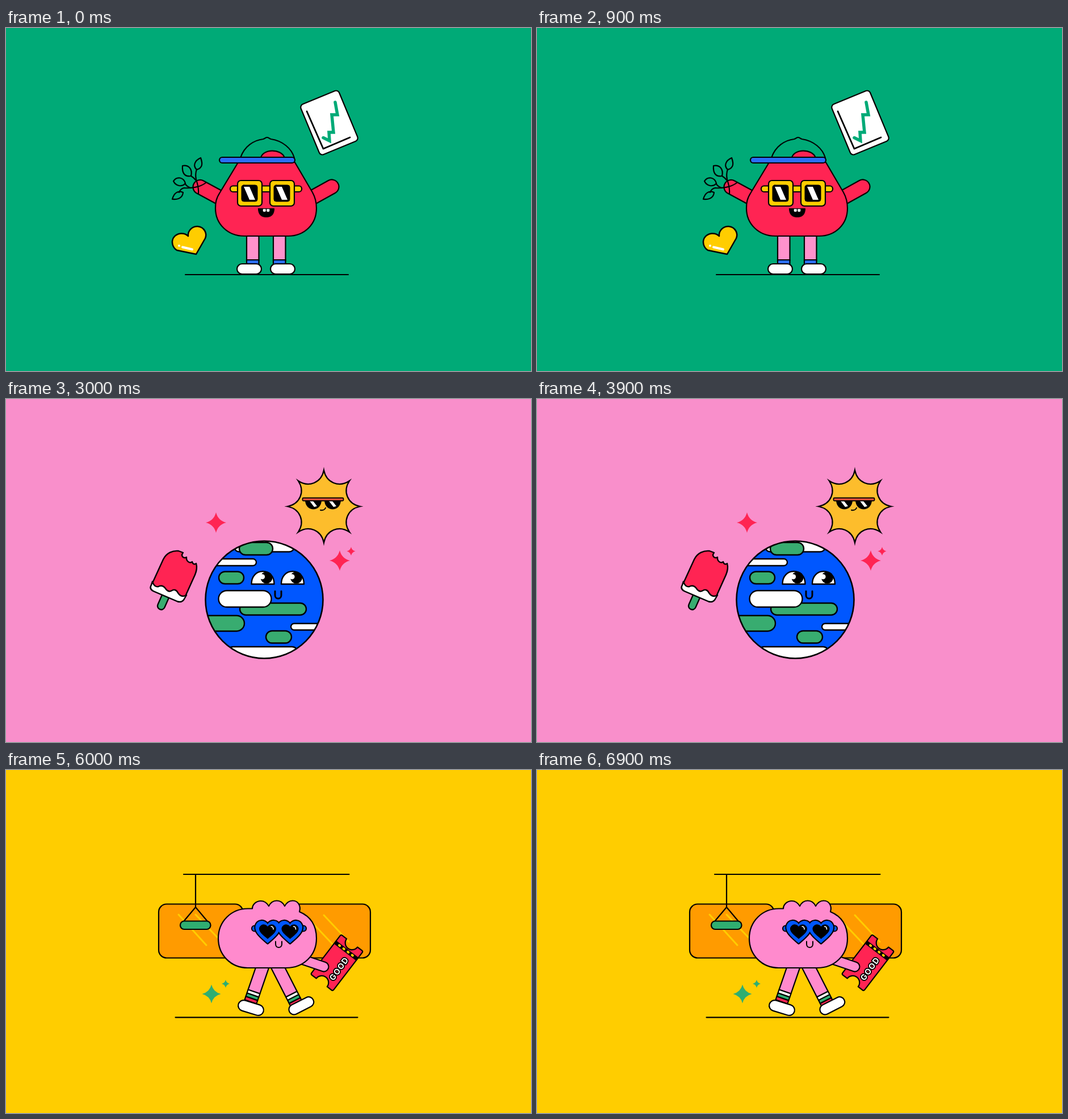
These frames come from a looping animation (925 px wide and 605 px high, 7.5 s). An HTML page with a canvas:

```html
<!DOCTYPE html>
<html lang="en">
<head>
<meta charset="utf-8">
<title>Five friends</title>
<style>
html, body { margin: 0; width: 100%; height: 100%; overflow: hidden; }
canvas { display: block; width: 925px; height: 605px; }
</style>
</head>
<body>
<canvas id="stage"></canvas>
<script>
const W = 925, H = 605, HOLD = 1500;
const cv = document.getElementById('stage');
const c = cv.getContext('2d');
const dpr = window.devicePixelRatio || 1;
cv.width = W * dpr;
cv.height = H * dpr;

const K = '#000', WHITE = '#fff', RED = '#ff2453', GREEN = '#00aa77', LEAF = '#38ac70',
  BLUE = '#2a6ef8', ROYAL = '#0057ff', YELLOW = '#ffcd00', PINK = '#ff8acd', BROWN = '#a5432f';
let lw = 2.2;

// Fill a path and outline it; pass 0 as width for no outline.
function shape(d, fill, w = lw, ink = K) {
  const p = new Path2D(d);
  if (fill) { c.fillStyle = fill; c.fill(p); }
  if (w) { c.lineWidth = w; c.strokeStyle = ink; c.stroke(p); }
}
const stroke = (d, w = lw, ink = K) => shape(d, null, w, ink);

function box(x, y, w, h, r, fill, line = lw) {
  c.beginPath();
  c.roundRect(x, y, w, h, r);
  c.fillStyle = fill;
  c.fill();
  if (line) { c.lineWidth = line; c.strokeStyle = K; c.stroke(); }
}
const pill = (x, y, w, h, fill) => box(x, y, w, h, Math.min(w, h) / 2, fill);

function disc(x, y, r, fill, line = 0) {
  c.beginPath();
  c.arc(x, y, r, 0, 7);
  if (fill) { c.fillStyle = fill; c.fill(); }
  if (line) { c.lineWidth = line; c.strokeStyle = K; c.stroke(); }
}

// Round-ended bar with an outline; w is the width between outline centres.
function limb(d, w, fill) {
  stroke(d, w + lw);
  stroke(d, w - lw, fill);
}

function at(x, y, deg, draw) {
  c.save();
  c.translate(x, y);
  c.rotate(deg * Math.PI / 180);
  draw();
  c.restore();
}

// Sock stripes hanging down from the origin.
const socks = (w, h, colors) =>
  colors.forEach((k, i) => box(-w / 2, i * h, w, h, 0, k));

function mouth(x, y, w, h, tooth, gap) {
  shape(`M${x} ${y}h${w}c0 ${h * .7} ${-w * .18} ${h} ${-w / 2} ${h}s${-w / 2} ${-h * .3} ${-w / 2} ${-h}z`, K, 1);
  for (const s of [-1, 1])
    box(x + w / 2 + s * (tooth + gap) / 2 - tooth / 2, y + .8, tooth, 5, [0, 0, 2, 2], WHITE, 0);
}

function sparkle(x, y, r, fill) {
  const k = r * .2;
  shape(`M${x} ${y - r}Q${x + k} ${y - k} ${x + r} ${y}Q${x + k} ${y + k} ${x} ${y + r}` +
    `Q${x - k} ${y + k} ${x - r} ${y}Q${x - k} ${y - k} ${x} ${y - r}z`, fill, 0);
}

function drop(x, top, bottom, r, fill) {
  const y = bottom - r, h = y - top;
  shape(`M${x} ${top}C${x + r * .25} ${top + h * .4} ${x + r} ${y - h * .4} ${x + r} ${y}` +
    `A${r} ${r} 0 0 1 ${x - r} ${y}C${x - r} ${y - h * .4} ${x - r * .25} ${top + h * .4} ${x} ${top}z`, fill);
  stroke(`M${x - r * .5} ${y + r * .05}q${r * .05} ${r * .5} ${r * .5} ${r * .6}`, r * .2, WHITE);
}

function heart(x, top, w, h) {
  const a = w / 2, y = top + h * .17;
  return `M${x} ${y}C${x - a * .2} ${top - h * .04} ${x - a * .85} ${top - h * .06} ${x - a} ${top + h * .25}` +
    `C${x - a * 1.08} ${top + h * .55} ${x - a * .4} ${top + h * .8} ${x} ${top + h}` +
    `C${x + a * .4} ${top + h * .8} ${x + a * 1.08} ${top + h * .55} ${x + a} ${top + h * .25}` +
    `C${x + a * .85} ${top - h * .06} ${x + a * .2} ${top - h * .04} ${x} ${y}z`;
}

function word(s, x, y, deg, font, fill, line, gap = 0) {
  at(x, y, deg, () => {
    c.font = font;
    c.letterSpacing = gap + 'px';
    c.textAlign = 'center';
    c.textBaseline = 'middle';
    if (line) { c.lineWidth = line; c.strokeStyle = K; c.strokeText(s, 0, 0); }
    c.fillStyle = fill;
    c.fillText(s, 0, 0);
  });
}

function cool() {
  lw = 2.2;
  stroke('M316 435H603');
  for (const x of [424, 471]) {
    box(x, 360, 21.5, 50, 0, '#ff92cc');
    box(x, 409, 21.5, 10, 0, BLUE);
  }
  pill(407, 416, 43, 18, WHITE);
  pill(466, 416, 43, 18, WHITE);
  limb('M342 280.5L378 300', 25, RED);
  limb('M574 280L538 300', 25, RED);
  shape('M409 237L377 290C370 301 369 308 369 318C369 346 391 367 420 367H497C526 367 547 346 547 318C547 306 545 299 540 290L509 237Z', RED);

  shape('M413 229C420 208 437 198 453 196C457 195 457 193 460 193S463 195 467 196C487 199 503 212 508 229Z', GREEN);
  shape('M449 229C452 213 485 212 491 229Z', RED);
  pill(376, 228, 133, 10, BLUE);

  box(395, 278.5, 126, 10.5, 5, YELLOW);
  for (const x of [408, 465]) box(x, 269, 43, 45, 6, YELLOW);
  for (const x of [415, 472]) {
    box(x, 277, 28, 29, 4, K, 1);
    shape(`M${x + 4} 280h10l10 23h-10z`, WHITE, 0);
  }
  mouth(444.5, 318.5, 28, 15, 5, 1.5);

  stroke('M352 273C342 281 325 283 314 282C309 283 306 287 305 290M316 275Q318 279 324 281.5M339 293C340 281 337 274 335 267Q333 258 336 249M326 261Q331 264 334 268');
  stroke('M293 302C296 291 303 286 312 290C311 299 305 303 293 302ZM295 270C301 261 313 263 316 274C310 281 299 279 295 270ZM311 243C322 241 329 249 326 261C314 263 310 255 311 243ZM343 229C347 240 346 247 336 250C329 243 332 234 343 229Z');

  shape('M335 399L301 392C293 387 291 377 295 370C301 361 314 360 321 367C320 357 329 349 338 350C349 351 355 362 351 371Z', YELLOW, 2.5);
  disc(305, 384, 2, WHITE);
  stroke('M311 386.5L328 390.5', 4, WHITE);

  at(569.5, 167, -22.5, () => box(-36.5, -48, 73, 96, 6, WHITE));
  stroke('M530 147L559 213L606 193', 2.8);
  c.lineJoin = 'miter';
  stroke('M580 131L584 153H574L577 184H569L570 199L559 193.5', 5.5, GREEN);
  c.lineJoin = 'round';
}

function surfer() {
  lw = 2;
  for (const y of [351, 391.5, 434.5]) {
    let d = '';
    for (let x = 288; x <= 635; x += 2)
      d += (d ? 'L' : 'M') + x + ' ' + (y + 8.5 * Math.cos((x - 288) / 77.1 * 2 * Math.PI));
    stroke(d, 14, '#003bd3');
  }
  shape('M304 420L291 405C288 401 289 396 293 393C296 391 299 392 301 395C303 401 309 403.5 320 403.5H468C478 403.5 483 402 486 396C489 391 494 391 496 395C498 399 497 402 494 406L484 418Q482 420 479 420Z', PINK);

  const rings = [BLUE, LEAF, '#ef3b62'];
  shape('M377 328V336Q377 341 374 344L357 364L371 377L393 351Q396 347 396 343V328Z', YELLOW);
  at(364, 370, 42, () => {
    socks(19, 5, rings);
    pill(-15, 14.5, 36, 16, WHITE);
  });
  box(407, 328, 19, 46, 0, YELLOW);
  at(416.5, 374, 0, () => socks(19, 5.3, rings));
  box(402, 390, 37, 14, [8, 8, 6, 6], WHITE);

  shape('M346 332C324 328 311 317 315 301C320 289 331 271 343 243C358 208 379 190 408 190C447 190 470 217 472 274C472 290 470 297 470 306C470 324 462 331 440 332Z', RED);
  stroke('M362 275C354 287 352 298 357 304C363 311 377 308 386 300');
  for (const x of [405, 442]) {
    shape(`M${x - 14} 249.5A14 15 0 0 1 ${x + 14} 249.5z`, WHITE);
    shape(`M${x - 7.5} 249A8 8.5 0 1 1 ${x + 8} 249z`, K, 0);
    disc(x - 4, 243.5, 4.6, WHITE);
  }
  mouth(407.5, 260.5, 30.5, 14.5, 6, 2);

  shape('M540 150L573 169C582 174 590 183 596 191C590 204 583 216 580 225L558 262Q555 269 547 265L490 234Q484 230 487 224L526 153Q532 146 540 150Z', YELLOW);
  shape('M537 155L562 170Q566 173 564 176Q563 178 559 178L526 175Q521 174 524 169L531 157Q533 153 537 155Z', BLUE);
  at(590, 179, 30, () => box(-12, -8.5, 24, 17, 4, WHITE));
  shape('M548 197C551 198 551 206 551 214C550 225 544 231 536 231C527 230 523 222 525 213C528 203 539 203 544 199Q546 197 548 197Z', K, 0);
  stroke('M529.5 212.5Q527.5 218 530 223', 2.2, WHITE);
  disc(533, 208, 1.7, WHITE);
  drop(561, 297, 326, 10, '#3cbc7b');
  drop(587.5, 341, 386, 15, '#3cbc7b');
}

function planet() {
  lw = 2.4;
  disc(455, 354, 103.5, ROYAL);
  c.save();
  c.beginPath();
  c.arc(455, 354, 103.5, 0, 7);
  c.clip();
  box(402, 230, 106, 39.5, 9, WHITE);
  pill(411, 253, 59, 22, LEAF);
  pill(340, 282, 101, 12, WHITE);
  pill(375, 304.5, 44, 21.5, LEAF);
  pill(412, 360, 117, 21, LEAF);
  pill(374.5, 338, 93, 29, WHITE);
  pill(330, 382, 90, 27.5, LEAF);
  pill(502, 396, 80, 11.5, WHITE);
  pill(458, 409, 45, 21.5, LEAF);
  box(390, 437, 124, 40, 10, WHITE);
  c.restore();
  disc(455, 354, 103.5, null, 2.6);

  for (const x of [452.5, 505]) {
    shape(`M${x - 20} 326.5C${x - 20} 312 ${x - 11} 304 ${x} 304S${x + 20} 312 ${x + 20} 326.5z`, WHITE);
    disc(x + 6.5, 315, 10.5, K);
    disc(x - 1, 313.5, 4.6, WHITE);
  }
  stroke('M474 339V346C474 354 485 354 485 346V339', 3);

  limb('M281 348L273.5 365', 13, LEAF);
  shape('M256 329L277 283C283 271 294 267 304 268L312 271C307 277 313 282 318 279C317 286 324 291 328 287C329 292 333 292 335 290C337 297 336 303 333 310L315 350Q311 360 302 357L260 339Q252 335 256 329Z', RED);
  shape('M258 322Q261 332 268 331Q275 327 280 333Q286 342 292 338Q299 334 303 342Q309 351 318 346L315 351Q311 360 302 357L260 339Q252 335 256 328Z', WHITE);

  // Eight spikes joined by inward curves.
  const pt = (deg, r) => {
    const a = deg * Math.PI / 180;
    return `${560 + r * Math.sin(a)} ${189.5 - r * Math.cos(a)} `;
  };
  let d = 'M' + pt(0, 64);
  for (let a = 0; a < 360; a += 45) d += 'C' + pt(a + 6, 42) + pt(a + 39, 42) + pt(a + 45, 64);
  c.lineJoin = 'miter';
  shape(d + 'z', '#fdbd2c', 2.2);
  c.lineJoin = 'round';
  for (const x of [527, 561]) {
    shape(`M${x} 178h29c0 22 -29 22 -29 0z`, K, 0);
    shape(`M${x + 8} 180h6l7 9l-5 1.5z`, WHITE, 0);
  }
  box(522.5, 174.5, 72, 5, 1.5, '#f0573f', 1.8);
  stroke('M554 196Q561 197 563 192', 2);

  sparkle(370, 218, 18, RED);
  sparkle(588, 285, 18, RED);
  sparkle(608, 268.5, 7.5, RED);
}

function fruit() {
  lw = 1.8;
  stroke('M296 431.3H637');
  const rings = [PINK, ROYAL];
  shape('M362 350V361Q361 366 358 370L346 384L363 400L380 381Q384 377 384 372V350Z', YELLOW);
  at(355, 391.5, 42, () => {
    socks(23, 6.5, rings);
    pill(-19, 10.5, 46, 18.5, WHITE);
  });
  box(394, 350, 23, 50, 0, YELLOW);
  at(405.5, 400.5, 0, () => socks(23, 6.3, rings));
  pill(388, 413, 45.5, 18, WHITE);

  limb('M440 321L488 315.5', 21.5, ROYAL);
  shape('M329 354V265C329 232 355 205 390 205C430 205 452 240 452 272V354Z', ROYAL);
  shape('M335 243C339 211 360 196 377 193.5C381 193 380 189.5 384 189.5S387 193 391 193.5C415 197 434 208 444 231Z', PINK);
  shape('M376 238C379 209 415 207 425 232Z', ROYAL);
  limb('M298.5 247L440 231', 10.5, GREEN);

  for (const x of [387, 426.5]) {
    disc(x, 271, 15, WHITE, lw);
    shape(`M${x} 256A15 15 0 0 1 ${x} 286z`, K, 0);
    disc(x + 1, 267, 4.2, WHITE);
  }
  mouth(391.5, 294.5, 26.5, 13.5, 5.5, 1.5);

  limb('M510 187L519 194.5', 4, BROWN);
  shape('M513 203C513 193 521 187 530 187C540 187 544 193 551 196C566 199 577 210 577 224C577 240 565 251 550 251C535 251 525 242 523 228C522 219 513 213 513 203Z', YELLOW);
  limb('M515 191L519 194.5', 4, BROWN);
  shape('M569 238L575 236.5V241L570 247L567 245Z', YELLOW);
  stroke('M518 205Q518.5 211 522 214', 5.5, WHITE);
  disc(528, 223.5, 3, WHITE);

  shape('M553 320C543 310 528 309 518 315C506 322 501 335 503 350C505 370 520 385 540 386C550 390 565 390 575 383C588 374 592 360 590 344C588 328 573 314 553 320Z', GREEN);
  limb('M560 305.5L555 322', 5.5, BROWN);
  shape('M528 384L531 380L541 382L543 388Z', YELLOW);
  stroke('M523 330Q529 323 538 322', 5, WHITE);
  disc(516, 338, 3, WHITE);
  stroke('M531 373C524 367 517 358 519 350C522 342 532 342 537 349C543 344 553 347 554 355C555 365 542 370 531 373Z', 1.5);
  word('MOM', 535.5, 359.5, 10, '700 10.5px Lato, sans-serif', K);

  disc(565, 344, 9, K);
  const worm = [[567, 341], [573, 336], [581, 333], [590, 337], [598, 337], [603, 331], [603, 323], [599, 315], [593, 309], [586, 308]];
  for (const [x, y] of worm) disc(x, y, 8.4, K);
  for (const [x, y] of worm) disc(x, y, 6.8, PINK);
  for (const [x, r] of [[579, 4.8], [590.5, 6]]) {
    disc(x, 307.5, r, WHITE, 1.6);
    disc(x, 307.5, r - 2, K);
    disc(x, 307.5, 1.3, WHITE);
  }
}

function rider() {
  lw = 2.2;
  const glass = '#ff9b00', mint = '#2fae71';
  stroke('M313 184H604.5M298.5 436.3H619.5');
  box(269, 236.5, 148.5, 95, 14, glass);
  box(495, 236.5, 147, 95, 14, glass);
  stroke('M304 255L353 309M334 255L374 297M526 255L577 309M560 256L604 303', 3, YELLOW);
  stroke('M334 184V242M313 267L334 242L355 267');
  box(307, 266.5, 53.5, 14.5, 7, mint);

  const rings = [WHITE, mint, RED];
  for (const [x, y, deg] of [[437, 391, 19], [503, 395.5, -27]])
    at(x, y, deg, () => {
      box(-11, -60, 22, 60, 0, PINK);
      socks(22, 6.3, rings);
    });
  at(431.5, 419.5, 17, () => pill(-23, -9.5, 46, 19, WHITE));
  at(520.3, 415.8, -27, () => pill(-23.5, -9, 47, 18, WHITE));

  at(583, 340, 37.4, () => {
    shape('M-22 -44H-12A12 12 0 0 0 12 -44H22Q24.5 -44 24.5 -41V41Q24.5 44 22 44H12A12 12 0 0 0 -12 44H-22Q-24.5 44 -24.5 41V-41Q-24.5 -44 -22 -44Z', RED);
    c.fillStyle = K;
    c.fillRect(-24.5, -30.5, 49, 7);
    for (let i = 0; i < 4; i++) box(-17.5 + i * 9.5, -29, 5.5, 4, 2, YELLOW, 0);
  });
  word('GOOD', 587.5, 351, -54, '700 14px Inter, sans-serif', WHITE, 3.6, 1.2);
  limb('M520 333.5L560 347', 17, PINK);

  shape('M426 244.5H434C434 238 440 231 449 231C456 231 460 235 463 240C466 234 470 230.5 477 230.5C484 230.5 488 234 491 240C495 233 500 230.5 505 230.5C515 230.5 520 240 517 250C536 258 547 274 547 297C547 327 524 349 494 349H426C396 349 374 326 374 297C374 267 397 244.5 426 244.5Z', PINK);

  const frame = [461, 500.5].map(x => heart(x, 265.5, 43, 40));
  box(433, 274.5, 96, 10, 5, ROYAL);
  frame.forEach(d => stroke(d, 4.4));
  frame.forEach(d => shape(d, ROYAL, 0));
  for (const x of [461, 500.5]) {
    shape(heart(x, 272.5, 29, 25), K, 1);
    stroke(`M${x + 6} 276q4 0 4 5`, 1.6, WHITE);
  }
  stroke('M475 302.5V307C475 315 486 315 486 307V302.5', 2);

  sparkle(362, 395, 16.5, mint);
  sparkle(387, 377, 7, mint);
}

const scenes = [[GREEN, cool], [BLUE, surfer], ['#f98fcb', planet], [RED, fruit], [YELLOW, rider]];
const start = performance.now();
let shown = -1;

function tick() {
  const n = Math.floor((performance.now() - start) / HOLD) % scenes.length;
  if (n !== shown) {
    shown = n;
    c.setTransform(dpr, 0, 0, dpr, 0, 0);
    c.lineCap = c.lineJoin = 'round';
    c.fillStyle = scenes[n][0];
    c.fillRect(0, 0, W, H);
    scenes[n][1]();
  }
  requestAnimationFrame(tick);
}
tick();
</script>
</body>
</html>
```
